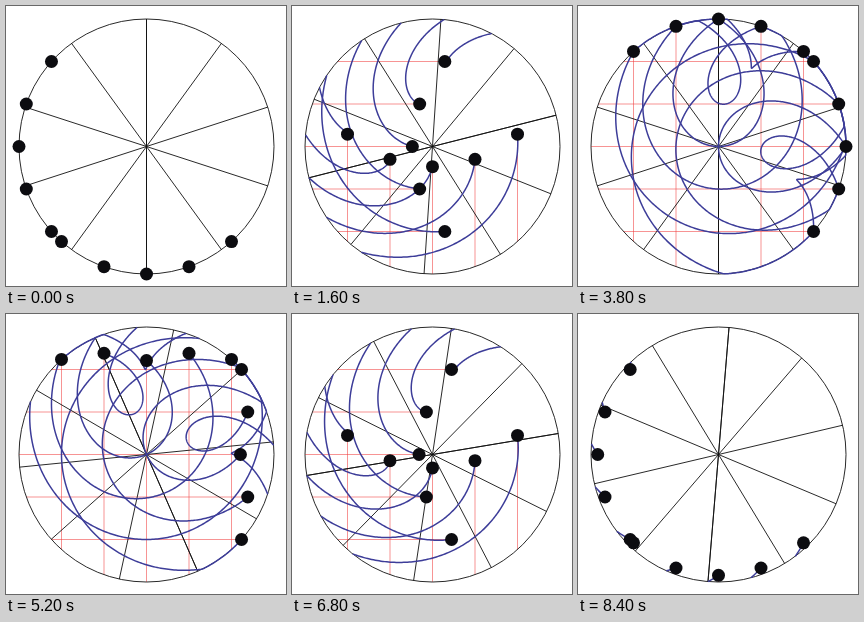
An HTML page with a canvas that plays this animation: 280 by 280 pixels, repeating every 8500 ms.

```html
<!DOCTYPE html>
<html lang="en">
<head>
<meta charset="utf-8">
<title>Straight paths on a turning disk</title>
<style>
  html, body { margin: 0; width: 100%; height: 100%; overflow: hidden; background: #fff; }
  canvas { display: block; width: 280px; height: 280px; }
</style>
</head>
<body>
<canvas id="stage" width="280" height="280"></canvas>
<script>
const ctx = document.getElementById('stage').getContext('2d');

const C = 140.5;               // disk centre
const R = 127.5;               // disk radius
const STEPS = 38;              // steps for half a turn
const TICK = 100;              // ms per step
const HOLD = 1000;             // pause at the far end
const LOOP = 8500;
const SPEED = 2 * R / STEPS;   // px per step
const TURN = Math.PI / STEPS;  // radians per step

// Five horizontal and five vertical chords.
const chords = [];
for (let k = -2; k <= 2; k++) {
  const off = k * R / 3;
  const half = Math.sqrt(R * R - off * off);
  chords.push({ off, half, across: true }, { off, half, across: false });
}

// Ball position relative to the centre; it halts at the rim.
function ballAt({ off, half, across }, step) {
  const s = Math.min(step * SPEED - half, half);
  return across ? [s, off] : [off, -s];
}

function rotate([x, y], a) {
  const c = Math.cos(a), s = Math.sin(a);
  return [x * c - y * s, x * s + y * c];
}

function stroke(color, width, path) {
  ctx.strokeStyle = color;
  ctx.lineWidth = width;
  ctx.beginPath();
  path();
  ctx.stroke();
}

function line(a, b) {
  ctx.moveTo(...a);
  ctx.lineTo(...b);
}

function trace(chord, step) {
  for (let u = 0; u <= step; u += 0.125) {
    ctx.lineTo(...rotate(ballAt(chord, u), (step - u) * TURN));
  }
}

function draw(step) {
  ctx.setTransform(1, 0, 0, 1, 0, 0);
  ctx.fillStyle = '#fff';
  ctx.fillRect(0, 0, 280, 280);
  ctx.translate(C, C);
  ctx.lineJoin = 'round';

  for (const c of chords) {
    stroke('rgba(240, 60, 60, 0.55)', 1, () => line(ballAt(c, 0), ballAt(c, step)));
  }

  // The first diameter is drawn twice and so looks heavier.
  for (let i = 0; i <= 5; i++) {
    const tip = rotate([0, -R], step * TURN + i * Math.PI / 5);
    stroke('#111', 0.9, () => line(tip, [-tip[0], -tip[1]]));
  }
  stroke('#111', 0.9, () => ctx.arc(0, 0, R, 0, 2 * Math.PI));

  for (const c of chords) {
    stroke('#3d3d99', 1.5, () => trace(c, step));
  }

  ctx.fillStyle = '#0c0c10';
  for (const c of chords) {
    ctx.beginPath();
    ctx.arc(...ballAt(c, step), 6.5, 0, 2 * Math.PI);
    ctx.fill();
  }
}

function stepAt(t) {
  const top = STEPS * TICK;
  if (t < top) return Math.floor(t / TICK);
  if (t < top + HOLD) return STEPS;
  return STEPS - 1 - Math.floor((t - top - HOLD) / TICK);
}

const start = performance.now();
function frame() {
  draw(stepAt((performance.now() - start) % LOOP));
  requestAnimationFrame(frame);
}
frame();
</script>
</body>
</html>
```
